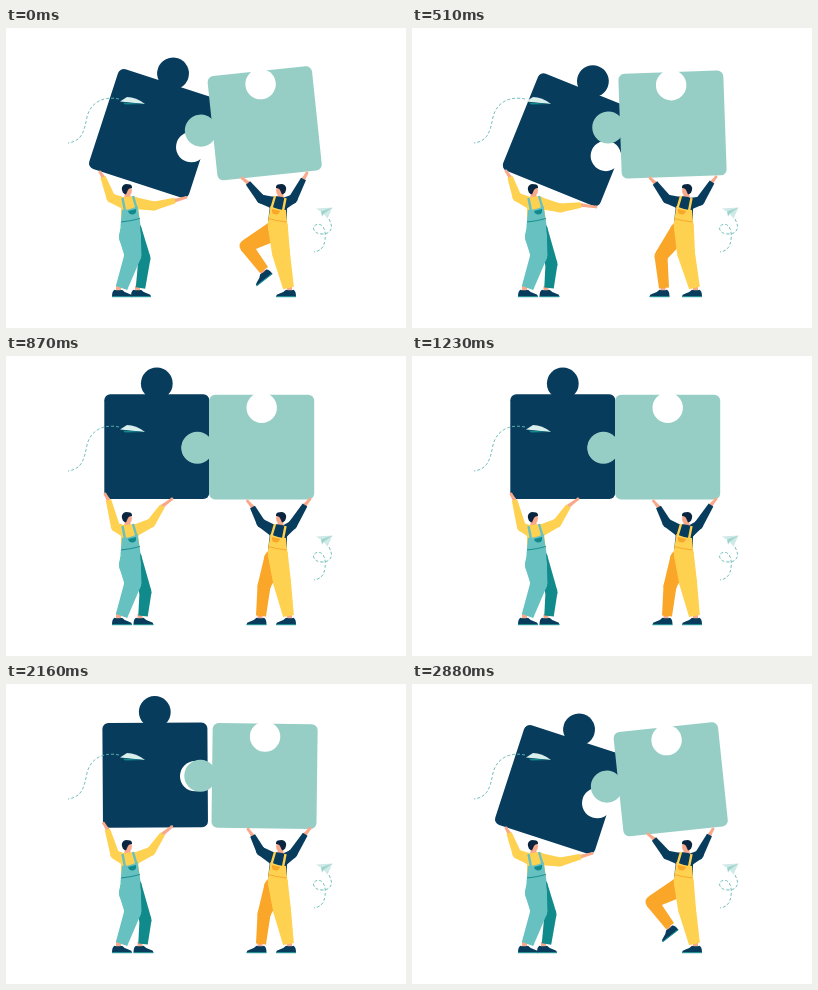
These frames come from a looping animation (400 by 300 pixels, 3000 ms). An HTML page with a canvas:

```html
<!DOCTYPE html>
<html lang="en">
<head>
<meta charset="utf-8">
<title>Puzzle builders</title>
<style>
html, body { margin: 0; width: 100%; height: 100%; overflow: hidden; background: #fff; }
canvas { display: block; width: 100vw; height: 100vh; }
</style>
</head>
<body>
<canvas id="stage"></canvas>
<script>
const canvas = document.getElementById('stage');
const ctx = canvas.getContext('2d');
const dpr = window.devicePixelRatio || 1;
canvas.width = 400 * dpr;
canvas.height = 300 * dpr;

const LOOP = 3000;
const NAVY = '#083c5d', MINT = '#96cec6', TEAL = '#67c1c1', DEEP = '#118a8c';
const YELLOW = '#ffd151', ORANGE = '#f9a629', SKIN = '#f8a98a', HAIR = '#0a2540';

// Pieces: x, y, degrees. Arms: elbow, wrist, hand. Legs: knee, ankle (+ shoe angle).
const tilted = {
  dark: [147.6, 105.4, 18], light: [258.7, 95.2, -6],
  leftOuter: [105, 170, 97, 149, 94, 144], leftInner: [148, 178, 169, 172.5, 180, 169.5],
  rightInner: [255, 171, 242, 155, 236, 150], rightOuter: [287, 171, 297.5, 151, 301, 145],
  leftBack: [138.5, 230, 134.5, 260], rightBack: [240, 218, 258, 242, -38], rightFront: [275, 225, 282.5, 260]
};
const wide = {
  dark: [157.3, 111.6, 22], light: [260.5, 96.5, -2],
  leftOuter: [105, 169, 98, 149, 94, 143], leftInner: [148, 180, 169, 177, 184, 179],
  rightInner: [255, 171, 243, 155, 238, 150], rightOuter: [288, 173, 300, 154, 304, 149],
  leftBack: [139.5, 236, 137, 260], rightBack: [249, 228, 252, 260, 0], rightFront: [274, 225, 282.5, 260]
};
const apart = {
  dark: [141, 90.3, -1.5], light: [265, 92.5, 3],
  leftOuter: [107, 170, 98, 150, 93, 143], leftInner: [145, 168, 157, 150, 165, 142],
  rightInner: [254, 168, 247, 153, 244, 146], rightOuter: [288, 172, 300, 154, 304, 149],
  leftBack: [139.5, 236, 137, 260], rightBack: [258, 230, 255, 260, 0], rightFront: [276, 226, 282.5, 260]
};
const joined = {
  ...apart, dark: [150.8, 90.5, 0], light: [255.7, 91, 0],
  leftOuter: [109.5, 171, 102.5, 144, 99, 138], leftInner: [145, 167, 156.5, 150, 166, 143],
  rightInner: [255, 167, 246.5, 151, 241.5, 145], rightOuter: [286.5, 169, 299, 149, 304, 143]
};
const settled = { ...joined, dark: [151.7, 91.2, 0], light: [256.6, 91.7, 0] };

const keys = [
  [0, tilted], [60, tilted], [270, wide], [510, wide], [660, apart], [790, joined],
  [1230, joined], [1830, settled], [2120, settled], [2250, apart], [2400, wide],
  [2640, wide], [2850, tilted], [LOOP, tilted]
];

function poseAt(time) {
  const i = keys.findIndex(([end]) => time < end);
  const [start, from] = keys[i - 1], [end, to] = keys[i];
  const p = (time - start) / (end - start), eased = p * p * (3 - 2 * p);
  const pose = {};
  for (const part in from) pose[part] = from[part].map((v, n) => v + (to[part][n] - v) * eased);
  return pose;
}

function circle(x, y, r, color) {
  ctx.fillStyle = color;
  ctx.beginPath();
  ctx.arc(x, y, r, 0, Math.PI * 2);
  ctx.fill();
}

function shape(d, color) {
  ctx.fillStyle = color;
  ctx.fill(new Path2D(d));
}

function line(d, color, width) {
  ctx.strokeStyle = color;
  ctx.lineWidth = width;
  ctx.stroke(new Path2D(d));
}

function placed(x, y, degrees, draw, flip = 1) {
  ctx.save();
  ctx.translate(x, y);
  ctx.rotate(degrees * Math.PI / 180);
  ctx.scale(flip, 1);
  draw();
  ctx.restore();
}

// Tapered limb through x, y pairs, rounded at the inner joints.
function limb(points, widths, color) {
  for (let i = 0; i < widths.length - 1; i++) {
    const [x1, y1, x2, y2] = points.slice(i * 2, i * 2 + 4);
    const length = Math.hypot(x2 - x1, y2 - y1) || 1;
    const nx = (y1 - y2) / length / 2, ny = (x2 - x1) / length / 2;
    const a = widths[i], b = widths[i + 1];
    ctx.fillStyle = color;
    ctx.beginPath();
    ctx.moveTo(x1 + nx * a, y1 + ny * a);
    ctx.lineTo(x2 + nx * b, y2 + ny * b);
    ctx.lineTo(x2 - nx * b, y2 - ny * b);
    ctx.lineTo(x1 - nx * a, y1 - ny * a);
    ctx.fill();
    circle(x1, y1, a / 2, color);
  }
}

function block(color) {
  ctx.fillStyle = color;
  ctx.beginPath();
  ctx.roundRect(-52.5, -52.3, 105, 104.8, 6);
  ctx.fill();
}

function darkPiece() {
  block(NAVY);
  circle(0, -63, 15.9, NAVY);
  circle(40, 1.4, 15.2, '#fff');
}

function lightPiece() {
  block(MINT);
  circle(-64.3, 0.7, 16, MINT);
  circle(0, -39.3, 15.2, '#fff');
}

function arm(shoulder, joints, color) {
  limb(joints.slice(2), [3.6, 2.6], SKIN);
  circle(joints[4], joints[5], 1.4, SKIN);
  limb([...shoulder, ...joints.slice(0, 4)], [12, 9, 5.5], color);
}

function shoe(x, y, flip, degrees = 0) {
  placed(x, y, degrees, () => {
    shape('M-2 -4 H3 V1 H-2 Z', SKIN);
    shape('M-6 6.5 Q-6 1 -3.5 -0.3 Q0 1 4 -0.3 Q7 3 11 3.8 Q14 4.6 14 6.5 Z', NAVY);
    shape('M-6 6.2 H14 V7.2 H-6 Z', DEEP);
  }, flip);
}

// Head and torso face right; the partner uses the mirrored drawing.
function upperBody(shirt, overalls, trim) {
  shape('M119 163 L124 164 L125 171 L118 172 Z', SKIN);
  shape('M115 171 Q122 167 131 169 L134 194 L115 196 Z', shirt);
  shape('M118 159 Q124 156 125.8 161 Q126.5 167 122 167.5 Q118 167 118 159 Z', SKIN);
  shape('M115.8 160 Q117 155.5 122 156.2 Q126.5 156 126 160 Q122.5 160 121.5 163 L120 166.5 Q115.8 165.5 115.8 160 Z', HAIR);
  shape('M116 182 Q124 182 131.5 178 L134.5 197 L114.5 198 Z', overalls);
  line('M116.5 170 L119 183 M127 168 L130.5 180', overalls, 2.4);
  line('M115 194 Q125 193 134 190.5', trim, 0.9);
  shape('M122 183 L130 181 Q131 186 126.5 186.5 Q123 186.5 122 183 Z', trim);
}

function leftWorker(pose) {
  shoe(pose.leftBack[2] - 3.5, 262, 1);
  limb([128, 201, ...pose.leftBack], [15, 12, 9.5], DEEP);
  shoe(112, 262, 1);
  limb([124.5, 197, 124, 209, 127, 227, 115.5, 260], [19, 22, 17, 12], TEAL);
  arm([120, 176], pose.leftOuter, YELLOW);
  arm([128, 175], pose.leftInner, YELLOW);
  upperBody(YELLOW, TEAL, DEEP);
}

function rightWorker(pose) {
  const [, , footX, footY, footAngle] = pose.rightBack;
  shoe(footX - 0.5, footY + 2, -1, footAngle);
  limb([268, 203, ...pose.rightBack.slice(0, 4)], [20, 13, 10], ORANGE);
  shoe(pose.rightFront[2] + 1.5, 262, -1);
  limb([271.8, 198, ...pose.rightFront], [20, 18, 11], YELLOW);
  arm([268, 175], pose.rightInner, NAVY);
  arm([277, 176], pose.rightOuter, NAVY);
  placed(396, 0, 0, () => upperBody(NAVY, YELLOW, ORANGE), -1);
}

function paperPlanes() {
  ctx.setLineDash([3, 2]);
  line('M113 71 C99 68 85 73 81 89 C78 104 76 113 62 115', '#62b9b5', 0.9);
  line('M323 191 C328 200 325 206 316 206 C307 206 305 198 311 196.5 C319 195 320 206 319 212 C318 220 314 223 308 224', '#62b9b5', 0.9);
  ctx.setLineDash([]);
  shape('M114 73.5 L121 69 Q130 69 139 76 Z', '#d8efec');
  shape('M117 74.5 L139 76 L119 76.6 Z', DEEP);
  shape('M310 180.5 L326.5 179.5 L321.5 190.5 L317 185 Z', '#cfe9e6');
  shape('M326.5 179.5 L315 183.5 L316 188.5 L318 185.5 Z', '#9fd4ce');
}

function draw(now) {
  const pose = poseAt(now % LOOP);
  ctx.setTransform(dpr, 0, 0, dpr, 0, 0);
  ctx.fillStyle = '#fff';
  ctx.fillRect(0, 0, 400, 300);
  placed(...pose.dark, darkPiece);
  placed(...pose.light, lightPiece);
  leftWorker(pose);
  rightWorker(pose);
  paperPlanes();
}

const begin = performance.now();
function tick() {
  draw(performance.now() - begin);
  requestAnimationFrame(tick);
}
tick();
</script>
</body>
</html>
```
